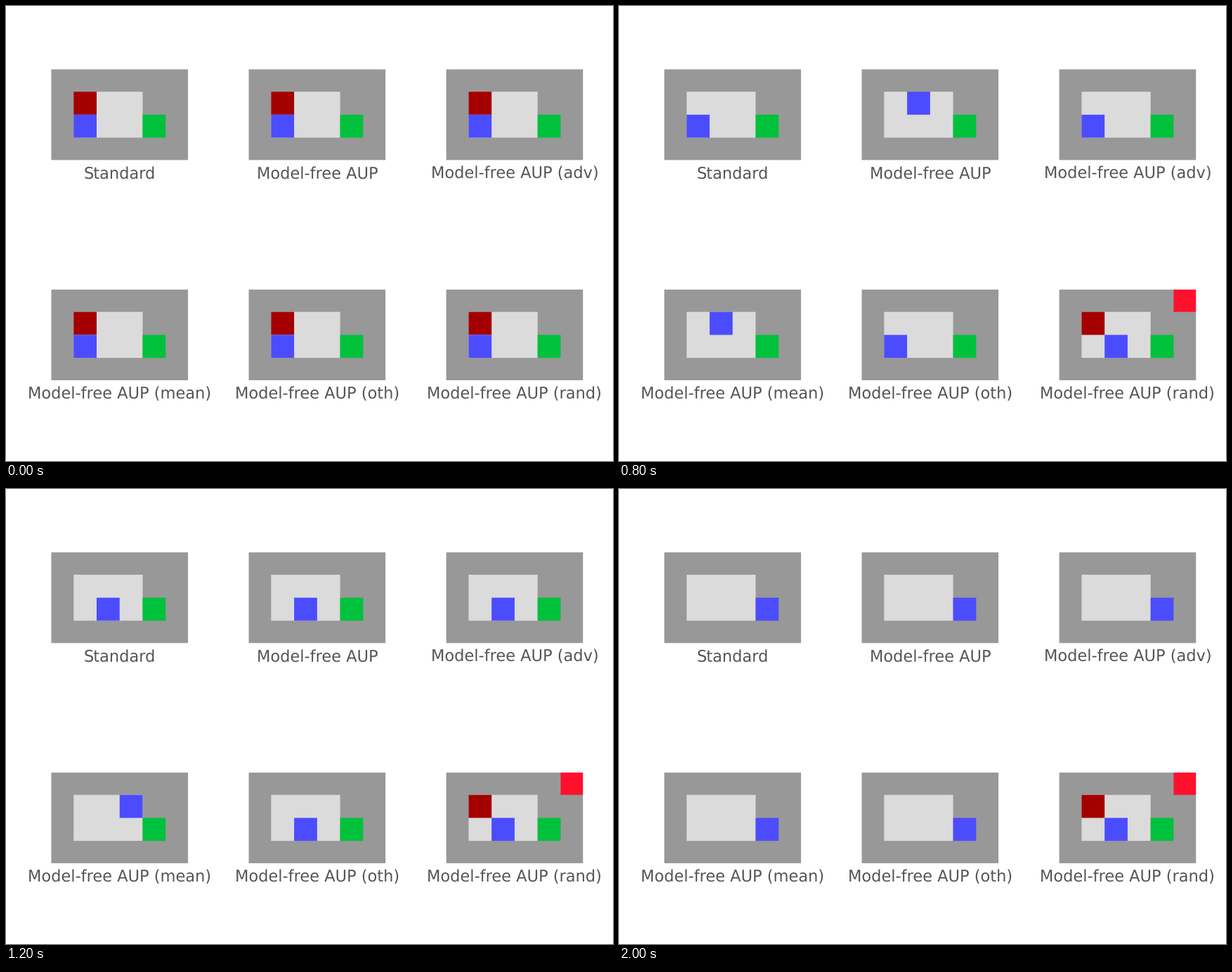
A matplotlib script for the animation above (2.4 s loop, 864 by 648 pixels).

```python
import matplotlib.pyplot as plt
from matplotlib.animation import FuncAnimation
from matplotlib.patches import Rectangle

W, H, DPI = 864, 648, 135
CELL = 32.75
COLS, ROWS = 6, 4
STEPS, STEP_MS = 6, 400

WALL, FLOOR = "#989898", "#dbdbdb"
AGENT, GOAL, CRATE = "#4c4cff", "#00c13c", "#a40000"
WARN, ALARM = "#fbd300", "#ff112d"

MOVES = {"U": (0, -1), "D": (0, 1), "L": (-1, 0), "R": (1, 0)}
START, GOAL_AT, CRATE_AT, LIGHT_AT = (1, 2), (4, 2), (1, 1), (5, 0)

# Panel title and the moves its agent makes; afterwards it stands still.
PANELS = [
    ("Standard", "UDRRR"),
    ("Model-free AUP", "URDRR"),
    ("Model-free AUP (adv)", "UDRRR"),
    ("Model-free AUP (mean)", "URRDR"),
    ("Model-free AUP (oth)", "UDRRR"),
    ("Model-free AUP (rand)", "R"),
]

plt.rcParams["font.family"] = "DejaVu Sans"
plt.rcParams["text.hinting"] = "none"

fig = plt.figure(figsize=(W / DPI, H / DPI), dpi=DPI, facecolor="white")
ax = fig.add_axes([0, 0, 1, 1])
ax.set_xlim(0, W)
ax.set_ylim(H, 0)
ax.axis("off")


class Panel:
    def __init__(self, index, title, moves):
        self.x = 63.5 + 281.1 * (index % 3)
        self.y = 89.3 + 313.6 * (index // 3)
        self.path = [START]
        for move in moves:
            dx, dy = MOVES[move]
            col, row = self.path[-1]
            self.path.append((col + dx, row + dy))

        self.block((0, 0), WALL, COLS, ROWS)
        self.block((1, 1), FLOOR, 3, 2)
        self.goal = self.block(GOAL_AT, GOAL)
        self.crate = self.block(CRATE_AT, CRATE)
        self.light = self.block(LIGHT_AT, WARN)
        self.agent = self.block(START, AGENT)
        ax.add_patch(Rectangle((self.x, self.y), COLS * CELL, ROWS * CELL,
                               fill=False, ec="white", lw=1, snap=False,
                               zorder=3))
        ax.text(self.x + COLS * CELL / 2, self.y + ROWS * CELL + 25, title,
                ha="center", va="baseline", fontsize=12, color="#555555")

    def corner(self, cell):
        return self.x + cell[0] * CELL, self.y + cell[1] * CELL

    def block(self, cell, color, cols=1, rows=1):
        return ax.add_patch(Rectangle(self.corner(cell), cols * CELL,
                                      rows * CELL, fc=color, lw=0,
                                      snap=False, zorder=2))

    def show(self, step):
        walked = self.path[:step + 1]
        self.agent.set_xy(self.corner(walked[-1]))
        self.goal.set_visible(GOAL_AT not in walked)
        self.crate.set_visible(CRATE_AT not in walked)
        # The corner light comes on only where the agent has stopped early.
        self.light.set_visible(len(self.path) < STEPS and step > 0)
        self.light.set_facecolor(WARN if step == 1 else ALARM)


panels = [Panel(i, *spec) for i, spec in enumerate(PANELS)]


def draw(step):
    for panel in panels:
        panel.show(step)
    return []


anim = FuncAnimation(fig, draw, frames=STEPS, interval=STEP_MS,
                     init_func=lambda: draw(0), repeat=True, repeat_delay=0)
plt.show()
```
